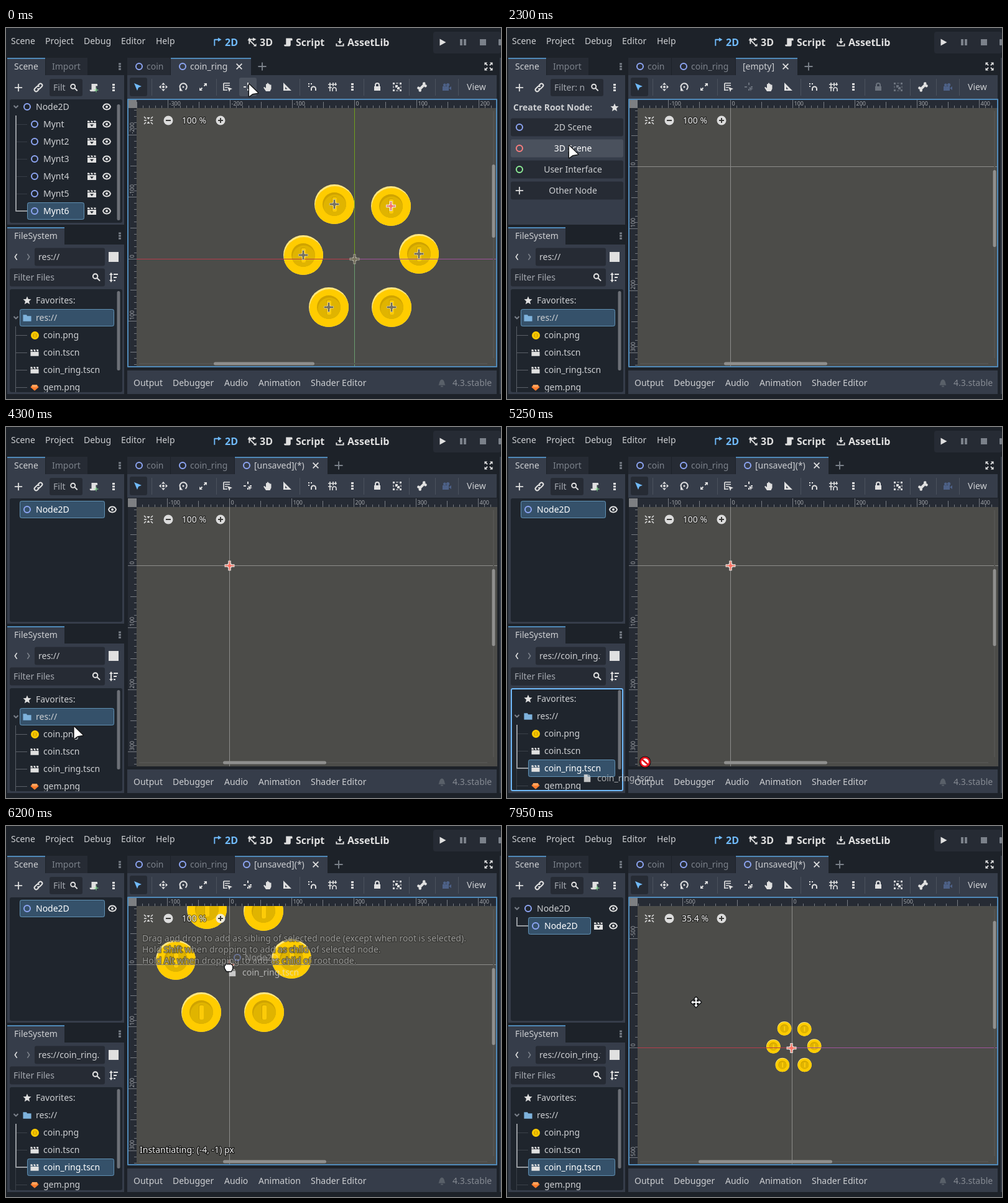
Write an HTML page with a canvas that moves like this. It is 796 px wide and 598 px high and loops after 8000 ms.

```html
<!DOCTYPE html>
<html lang="en">
<head>
<meta charset="utf-8">
<title>Scene instancing</title>
<style>
html, body { margin: 0; width: 100%; height: 100%; overflow: hidden; background: #1d2229; }
canvas { display: block; width: 100vw; height: 100vh; }
</style>
</head>
<body>
<canvas id="stage" width="796" height="598"></canvas>
<script>
const g = document.getElementById('stage').getContext('2d');
const LOOP = 8000, STEP = 50;
const BASE = '#363d4a', DARK1 = '#262b34', DARK2 = '#1d2229', TREE = '#1f252d', VIEW = '#4c4c49';
const ACCENT = '#70bafa', EDGE = '#5089b8', SELECT = '#35516a', HOVER = '#4a515d';
const ICON = '#e0e0e0', TEXT = '#cdcfd2', DIM = '#7b818a', NODE = '#8da5f3', RED = '#fc7f7f', GREEN = '#8eef97';
const FONT = '"Noto Sans", sans-serif';
const COINS = [[-32.5, -88.5], [58.5, -85.5], [103.5, -8.5], [-82.5, -6.5], [-41.5, 77.5], [59.5, 77.5]];

// Pointer keys: time, x, y
const POINTER = [
  [0, 391, 91], [300, 411, 60], [800, 411, 60], [1300, 287, 274], [1600, 118, 240], [1700, 118, 240],
  [2150, 100, 190], [2300, 100, 190], [3100, 93, 153], [3450, 93, 153], [4200, 108, 455], [4750, 114, 546],
  [4950, 114, 546], [5200, 121, 552], [5250, 222, 540], [5400, 390, 440], [5600, 452, 342], [5650, 446, 308],
  [5800, 424, 268], [6150, 356, 222], [6550, 356, 222], [7100, 470, 300], [7500, 470, 300],
  [7650, 276, 199], [7700, 276, 199], [7950, 304, 284]
];

// Icons on a 16 px box: fill path, stroke path, stroke width
const ICONS = {
  select: ['M2 2l12 5-5 2-2 5z'],
  move: ['M8 1l3 3.4H5zM8 15l3-3.4H5zM1 8l3.4-3v6zM15 8l-3.4-3v6zM6 8a2 2 0 1 0 4 0a2 2 0 1 0-4 0z'],
  rotate: ['M2 9v5.5h5.5zM6.5 8a1.5 1.5 0 1 0 3 0a1.5 1.5 0 1 0-3 0z', 'M4.6 12.2A5.6 5.6 0 1 1 11.5 12.4', 2],
  scale: ['M9 2h5v5zM2 9v5h5z', 'M4 12l2.5-2.5M9.5 6.5L12 4', 2],
  list: ['M8 8l8 3-3.4 1.4L11 16z', 'M2 2v12M2 2h10M4 5.5h8M4 9h4M2 13h6', 1.7],
  pivot: ['M8 8l7 3-3 1-1 3z', 'M8 1v4M8 11v3M1 8h4M11 8h3', 2],
  hand: ['M5 15L1 9l1.5-1L5 10V4a1 1 0 0 1 2 0V2.5a1 1 0 0 1 2 0V4a1 1 0 0 1 2 0v1.5a1 1 0 0 1 2.5 0V11l-2 4z'],
  angle: ['M2 1v13h13zM5 8v3.5h3.5z'],
  snap: ['M1 2h2v2H1zM1 6h2v2H1zM5 2h2v2H5z', 'M6 14v-3a3.5 3.5 0 0 1 7 0v3', 2],
  grid: ['', 'M1 4h14M1 9h6M4 1v14M9 1v6M13 1v5M8 15v-3a2.8 2.8 0 0 1 6 0v3', 1.6],
  dots: ['M6 2h4v3H6zM6 6.5h4v3H6zM6 11h4v3H6z'],
  lock: ['M3 7h10v7H3z', 'M5 8V5a3 3 0 0 1 6 0v3', 2],
  group: ['M1 1h3v3H1zM12 1h3v3h-3zM1 12h3v3H1zM12 12h3v3h-3zM5 5h4v4H5zM8 8h4v4H8z', 'M6 2h4M2 6v4M14 6v4M6 14h4', 1],
  bone: ['M9 3a2.3 2.3 0 1 1 4 1a2.3 2.3 0 1 1-1 4zM7 13a2.3 2.3 0 1 1-4-1a2.3 2.3 0 1 1 1-4z', 'M4.5 11.5l7-7', 4],
  camera: ['M1 7h10v7H1zM11 10l4-3v6zM2 5a2.4 2.4 0 1 0 4.8 0a2.4 2.4 0 1 0-4.8 0zM7 4.5a2.6 2.6 0 1 0 5.2 0a2.6 2.6 0 1 0-5.2 0z'],
  clap: ['M1 7h14v7H1zM1 3h3l1 3H1zM6 3h3l1 3H7zM11 3h3.5v3H12z'],
  open: ['M1 6h14v8H1zM1 2.5h3l1 2.5H1zM6 2.5h3l1 2.5H7zM11 2.5h3.5V5H12zM5 8.5l3 3.5 3-3.5z'],
  eye: ['M6 8a2 2 0 1 0 4 0a2 2 0 1 0-4 0z', 'M2 8C4 2 12 2 14 8C12 14 4 14 2 8z', 2],
  find: ['', 'M2.5 6a4 4 0 1 0 8 0a4 4 0 1 0-8 0M9.5 9l5 5', 2.2],
  plus: ['', 'M8 1v14M1 8h14', 2],
  cross: ['', 'M3 3l10 10M13 3L3 13', 2],
  link: ['', 'M7 5l2.5-2.5a2.8 2.8 0 0 1 4 4L10.500 9.500a2.800 2.800 0 0 1-4 0M9 11l-2.500 2.500a2.800 2.800 0 0 1-4-4L5.500 6.500a2.800 2.800 0 0 1 4 0', 2],
  script: ['M4 1h10a2 2 0 0 1 1 2v2h-3v7a3 3 0 0 1-3 3H3a2 2 0 0 1-2-3h3z'],
  star: ['M8 1l2 4.800 5 .4-3.800 3.400 1.200 5L8 12l-4.400 2.600 1.200-5L1 6.200l5-.4z'],
  folder: ['M1 3h6l1 2h7v9H1z'],
  sort: ['M4 0l3 4H1zM4 16l3-4H1z', 'M4 3v10M8 3h7M8 8h5M8 13h3', 2],
  full: ['M1 1h5L1 6zM15 1v5l-5-5zM1 15v-5l5 5zM15 15h-5l5-5z', 'M3 3l3 3M13 3l-3 3M3 13l3-3M13 13l-3-3', 2],
  two: ['M9 0l6 3.500L9 7z', 'M3 14V3.500h7', 2],
  three: ['M9 0l6 3L9 6zM10 15h5v-5zM0 5l3-5 3 5z', 'M3 4v7M3 3h7M4 5l9 9', 2],
  asset: ['M4 6h8l-4 5z', 'M8 1v6M2 10v4h12v-4', 2],
  center: ['M8 6.500L5.500 3h5zM8 9.500L5.500 13h5z', 'M1 2l3 3M15 2l-3 3M1 14l3-3M15 14l-3-3M1 8h4M11 8h4', 1.500],
  down: ['', 'M4.500 6L8 9.500 11.500 6', 2],
  left: ['', 'M10 2L6 8l4 6', 2],
  right: ['', 'M6 2l4 6-4 6', 2],
  bell: ['M2 12c2-2 1-9 6-10c5 1 4 8 6 10zM6 13h4v2H6z'],
  file: ['M2 1h7v4h5v10H2zM10 1l4 3h-4z'],
  gem: ['M4 4h8l3 4-7 6-7-6z']
};

function icon(name, x, y, color = ICON, size = 16) {
  const [fill, stroke, width] = ICONS[name];
  g.save();
  g.translate(x - size / 2, y - size / 2);
  g.scale(size / 16, size / 16);
  g.fillStyle = g.strokeStyle = color;
  if (fill) g.fill(new Path2D(fill), 'evenodd');
  if (stroke) { g.lineWidth = width; g.stroke(new Path2D(stroke)); }
  g.restore();
}
function box(x, y, w, h, fill, r = 0) {
  g.fillStyle = fill;
  g.beginPath(); g.roundRect(x, y, w, h, r); g.fill();
}
function frame(x, y, w, h, color, lw = 2, r = 2) {
  g.strokeStyle = color; g.lineWidth = lw;
  g.beginPath(); g.roundRect(x, y, w, h, r); g.stroke();
}
function line(color, w, ...p) {
  g.strokeStyle = color; g.lineWidth = w;
  g.beginPath();
  for (let i = 0; i < p.length; i += 2) g.lineTo(p[i], p[i + 1]);
  g.stroke();
}
function disc(x, y, r, color) {
  g.fillStyle = color;
  g.beginPath(); g.arc(x, y, r, 0, 7); g.fill();
}
function ring(x, y, color = NODE, r = 5) {
  g.strokeStyle = color; g.lineWidth = 2;
  g.beginPath(); g.arc(x, y, r, 0, 7); g.stroke();
}
function text(s, x, y, color = TEXT, { size = 14, bold, align = 'left', outline } = {}) {
  g.font = (bold ? '700 ' : '') + size + 'px ' + FONT;
  g.textAlign = align;
  if (outline) {
    g.strokeStyle = outline; g.lineWidth = 2.5; g.lineJoin = 'round';
    g.strokeText(s, x, y + 5);
  }
  g.fillStyle = color;
  g.fillText(s, x, y + 5);
}
function clipped(x, y, w, h, draw) {
  g.save();
  g.beginPath(); g.rect(x, y, w, h); g.clip();
  draw();
  g.restore();
}
function field(x, y, w, h, s, color, room) {
  box(x, y, w, h, DARK1, 3);
  clipped(x, y, room, h, () => text(s, x + 6, y + h / 2, color));
}
function selected(x, y, w) {
  box(x, y - 14, w, 28, SELECT, 3);
  frame(x + .5, y - 13.5, w - 1, 27, '#6191b3', 1, 3);
}
function tab(x, y, w, active) {
  box(x, y, w, 28, active ? BASE : DARK1);
  if (active) box(x, y, w, 2, EDGE);
}

function pointer(t) {
  const k = POINTER;
  let i = 0;
  while (i < k.length - 2 && t >= k[i + 1][0]) i++;
  const a = k[i], b = k[i + 1], d = b[0] - a[0];
  const u = Math.min(1, (t - a[0]) / d);
  const slope = (n, c) => {
    const p = k[n - 1], q = k[n], r = k[n + 1];
    const still = (m, s) => m[1] === s[1] && m[2] === s[2];
    return !p || !r || still(p, q) || still(q, r) ? 0 : (r[c] - p[c]) / (r[0] - p[0]);
  };
  const at = c => {
    const u2 = u * u, u3 = u2 * u;
    return (2 * u3 - 3 * u2 + 1) * a[c] + (u3 - 2 * u2 + u) * d * slope(i, c)
      + (3 * u2 - 2 * u3) * b[c] + (u3 - u2) * d * slope(i + 1, c);
  };
  return { x: at(1), y: at(2) };
}

function stateAt(t) {
  const mouse = pointer(t);
  const s = {
    t, mouse,
    page: t < 800 ? 'ring' : t < 3450 ? 'empty' : 'unsaved',
    picked: t >= 4900,
    dragging: t >= 5100 && t < 6500,
    over: t >= 5300 && t < 6500,
    dropped: t >= 6500,
    panning: t >= 7700,
    zoom: 2 ** (-Math.max(0, Math.min(3, Math.floor((t - 7200) / 100))) / 2),
    ghost: pointer(t - STEP)
  };
  if (s.page === 'ring') s.origin = { x: 560.5, y: 372.5 };
  else {
    const pan = s.panning ? mouse : { x: 276, y: 199 };
    s.origin = {
      x: 470 + (359.5 - 470) * s.zoom + pan.x - 276,
      y: 300 + (223.5 - 300) * s.zoom + pan.y - 199
    };
  }
  return s;
}

function drawTop() {
  ['Scene', 'Project', 'Debug', 'Editor', 'Help'].forEach((m, i) => text(m, [8, 63, 125, 185, 241][i], 21));
  [['two', 340, '2D', 352], ['three', 396, '3D', 408], ['script', 454, 'Script', 466], ['asset', 537, 'AssetLib', 549]]
    .forEach(([n, x, s, tx], i) => {
      const c = i ? ICON : ACCENT;
      icon(n, x, 23, c, 15);
      text(s, tx, 24, c, { size: 16, bold: true });
    });
  box(687, 6, 109, 35, DARK1, 4);
  g.fillStyle = ICON;
  g.fill(new Path2D('M697.500 17.500v11l10-5.500z'));
  box(730, 18, 4, 10, DIM); box(736, 18, 4, 10, DIM);
  box(762, 18, 10, 10, DIM);
  box(792, 18, 4, 10, DIM, 1);
}

function drawSceneDock(s) {
  tab(2, 48, 61, true); tab(64, 48, 67, false);
  text('Scene', 13, 62); text('Import', 74, 62, DIM);
  icon('dots', 183, 62, DIM, 15);
  box(2, 76, 188, 241, BASE);
  icon('plus', 20, 96, ICON, 14); icon('link', 52, 96); icon('dots', 173, 96);
  const empty = s.page === 'empty';
  field(70, 82, empty ? 85 : 53, 28, 'Filter: name', '#a5a9b0', empty ? 56 : 26);
  icon('find', empty ? 141 : 109, 96, ICON, 14);
  if (empty) return drawRootChoice(s);
  icon('script', 141, 96, ICON, 14);
  icon('plus', 145, 100, GREEN, 8);
  box(6, 115, 181, 199, TREE, 3);
  if (s.page === 'ring') {
    icon('down', 16, 127, DIM); ring(34, 127); text('Node2D', 48, 127); icon('eye', 162, 127);
    for (let i = 0; i < 6; i++) {
      const y = 155 + i * 28;
      if (i === 5) selected(34, y, 92);
      else line('#363c45', 1, 17, y + .5, 34, y + .5);
      ring(46, y); text('Mynt' + (i ? i + 1 : ''), 60, y, i === 5 ? '#fff' : TEXT);
      icon('open', 138, y); icon('eye', 162, y);
    }
    line('#979ba0', 2, 16, 141, 16, 295, 34, 295);
    box(178.5, 123, 5, 187, '#6c7077', 2.5);
    return;
  }
  if (!s.dropped) selected(22, 133, 137);
  else {
    icon('down', 16, 133, DIM);
    line('#979ba0', 2, 16, 147, 16, 161, 34, 161);
    selected(34, 161, 101);
    ring(46, 161); text('Node2D', 60, 161, '#fff');
    icon('open', 147, 161); icon('eye', 171, 161);
  }
  ring(34, 133); text('Node2D', 48, 133, s.dropped ? TEXT : '#fff'); icon('eye', 171, 133);
}

function drawRootChoice(s) {
  text('Create Root Node:', 10, 128, TEXT, { bold: true });
  icon('star', 173, 128, ICON, 15);
  ['2D Scene', '3D Scene', 'User Interface', 'Other Node'].forEach((label, i) => {
    const y = 160 + i * 34, { x, y: my } = s.mouse;
    const press = !i && s.t >= 3200;
    const hover = !press && x < 187 && Math.abs(my - y) < 15;
    box(6, y - 14.5, 181, 29, hover ? HOVER : DARK1, 3);
    if (press) frame(7, y - 13.500, 179, 27, ACCENT);
    if (i < 3) ring(20, y, press ? '#478cf0' : [NODE, RED, GREEN][i]);
    else icon('plus', 20, y, ICON, 14);
    text(label, 106, y, press ? ACCENT : hover ? '#fff' : TEXT, { align: 'center' });
  });
}

function drawFiles(s) {
  tab(2, 321, 92, true);
  text('FileSystem', 13, 335);
  icon('dots', 183, 335, DIM, 15);
  box(2, 349, 188, 241, BASE);
  icon('left', 16, 369, ICON, 13); icon('right', 36, 369, DIM, 13);
  field(46, 354.5, 113, 29, s.picked ? 'res://coin_ring.tscn' : 'res://', TEXT, 105);
  box(165, 361, 16, 16, ICON);
  field(6, 387.5, 153, 29, 'Filter Files', '#a5a9b0', 130);
  icon('find', 145, 402, ICON, 15); icon('sort', 173, 402);
  box(6, 421, 181, 166, TREE, 3);
  clipped(6, 421, 181, 166, () => {
    const top = s.picked ? 438 : 439, row = i => top + i * 28;
    if (s.picked) selected(34, row(4), 140); else selected(22, row(1), 152);
    icon('star', 34, row(0), ICON, 15); text('Favorites:', 48, row(0));
    icon('down', 16, row(1), DIM); icon('folder', 34, row(1), '#7eb2dc', 15); text('res://', 48, row(1));
    const faint = s.picked ? '#3b4149' : '#5b6068';
    line(faint, 1, 15.5, row(1) + 14, 15.5, 590);
    ['coin.png', 'coin.tscn', 'coin_ring.tscn', 'gem.png'].forEach((name, i) => {
      const y = row(i + 2);
      if (!s.picked || i !== 2) line(faint, 1, 16, y + .5, 34, y + .5);
      if (!i) { disc(46.5, y + .5, 6.5, '#ffcc00'); disc(46.5, y + .5, 3.5, '#d9aa00'); box(45.5, y - 2, 2, 5, '#ffcc00'); }
      else if (i < 3) icon('clap', 46, y, ICON, 15);
      else { icon('gem', 46, y, '#ff7d2e', 15); box(42, y - 4, 8, 4, '#ffa35c'); }
      text(name, 60, y, s.picked && i === 2 ? '#fff' : TEXT);
    });
    if (s.picked) line('#979ba0', 2, 16, row(1) + 14, 16, row(4), 34, row(4));
  });
  box(178.5, 424, 5, 128, '#6c7077', 2.5);
  if (s.picked && s.t < 5300) frame(7, 422, 179, 164, ACCENT);
}

function drawTabs(s) {
  const ringPage = s.page === 'ring', hot = s.t >= 200 && s.t < 850;
  tab(195, 48, 69, false); ring(214, 62); text('coin', 226, 62, DIM);
  tab(265, 48, ringPage ? 129 : 102, ringPage);
  ring(284, 62); text('coin_ring', 296, 62, ringPage ? TEXT : DIM);
  let end = 394;
  if (!ringPage) {
    const empty = s.page === 'empty';
    end = empty ? 467 : 517;
    tab(368, 48, end - 368, true);
    if (!empty) ring(387, 62);
    text(empty ? '[empty]' : '[unsaved](*)', empty ? 379 : 399, 62);
  }
  icon('cross', end - 19, 62, ICON, 14);
  icon('plus', end + 18, 62, hot ? ICON : DIM, 15);
  icon('full', 776, 62, ICON, 15);
}

function drawTools(s) {
  box(195, 76, 594, 38, BASE);
  box(199, 80, 28, 30, DARK1, 3);
  if (s.page === 'ring' && s.mouse.y > 80) box(375, 80, 28, 30, HOVER, 3);
  [234, 338, 472, 575, 648, 690, 727].forEach(x => line('#4b525e', 1, x + .5, 82, x + .5, 109));
  icon('select', 212, 95, ACCENT);
  const off = s.page === 'empty' ? '#6b727d' : ICON;
  Object.entries({ move: 253, rotate: 285, scale: 317, list: 356, hand: 421, angle: 452, snap: 493, grid: 525, dots: 557, bone: 669 })
    .forEach(([n, x]) => icon(n, x, 95));
  icon('pivot', 389, 95, off); icon('lock', 597, 95, off); icon('group', 629, 95, off);
  icon('camera', 709, 95, '#4d6187');
  text('View', 741, 95);
}

function coin(x, y, z) {
  g.save();
  g.translate(x, y); g.scale(z, z);
  disc(0, 0, 32, '#ffe680');
  g.beginPath(); g.arc(0, 0, 32, 0, 7); g.clip();
  disc(1, 3, 32, '#ffcc00');
  disc(0, 0, 19, '#cfa300');
  g.beginPath(); g.arc(0, 0, 19, 0, 7); g.clip();
  disc(1, 3, 18.5, '#e0b400');
  box(-4, -12, 8, 24, '#d0a400', 2);
  box(-3, -11, 7, 23, '#fccb08', 2);
  g.restore();
}
function coinRing(x, y, z) { COINS.forEach(([dx, dy]) => coin(x + dx * z, y + dy * z, z)); }

function gizmo(x, y, on) {
  const plus = (r, w, c) => { line(c, w, x - r, y, x + r, y); line(c, w, x, y - r, x, y + r); };
  plus(8, on ? 4.5 : 4, on ? '#e8e2de' : 'rgba(196,192,176,.75)');
  disc(x, y, 4, on ? '#e8e2de' : 'rgba(196,192,176,.75)');
  plus(7, 2, on ? '#ee7a6a' : '#6a6552');
  disc(x, y, 2.6, on ? '#ff7264' : '#77725e');
}

function rulers(o, z) {
  box(196, 115, 594, 14, DARK1); box(196, 115, 14, 432, DARK1);
  const major = z < 1 ? 500 : 100, gap = major * z / 10;
  const len = i => i % 10 ? i % 5 ? 4 : 10 : 14;
  const opts = { size: 9 }, c = '#a2a5a9', tick = '#777b82';
  for (let i = Math.ceil((210 - o.x) / gap); o.x + i * gap < 789; i++) {
    const x = Math.floor(o.x + i * gap) + .5;
    line(tick, 1, x, 129 - len(i), x, 129);
    if (i % 10 === 0) text(String(i / 10 * major), x + 2, 120, c, opts);
  }
  for (let i = Math.ceil((129 - o.y) / gap); o.y + i * gap < 546; i++) {
    const y = Math.floor(o.y + i * gap) + .5;
    line(tick, 1, 210 - len(i), y, 210, y);
    if (i % 10) continue;
    g.save();
    g.translate(206, y - 2); g.rotate(-Math.PI / 2);
    text(String(i / 10 * major), 0, -5, c, opts);
    g.restore();
  }
  box(196, 115, 14, 14, '#7d7f82');
}

function drawCanvas(s) {
  const { origin: o, zoom: z, page, mouse, ghost } = s;
  const drop = { x: Math.round(ghost.x) - 360, y: Math.round(ghost.y) - 223 };
  box(196, 115, 594, 432, VIEW);
  clipped(210, 129, 580, 418, () => {
    if (page === 'ring') coinRing(o.x, o.y, 1);
    if (s.over) coinRing(o.x + drop.x, o.y + drop.y, 1);
    if (s.dropped) coinRing(o.x - 4 * z, o.y - z, z);
    const x = Math.floor(o.x) + .5, y = Math.floor(o.y) + .5;
    const plain = '#8d8d8b', tint = page === 'ring' || z < 1;
    line(tint ? '#b53c4c' : plain, 1, 210, y, x, y);
    line(tint ? '#a0539c' : plain, 1, x, y, 790, y);
    line(page === 'ring' ? '#71a21c' : plain, 1, x, 129, x, y);
    line(page === 'ring' ? '#6b9e70' : plain, 1, x, y, x, 547);
    if (page === 'ring') {
      gizmo(o.x, o.y, false);
      COINS.forEach(([dx, dy], i) => gizmo(o.x + dx, o.y + dy, i === 1));
    }
    if (page === 'unsaved') gizmo(o.x - (s.dropped ? 4 * z : 0), o.y, true);
  });
  rulers(o, z);

  // Scroll bars
  const k = page === 'ring' ? 0 : (1 - z) / (1 - 2 ** -1.5);
  const mix = (a, b) => a + (b - a) * k;
  const [hx, hw, vy, vh] = page === 'ring' ? [334, 162, 220, 118]
    : [mix(349, 308), mix(166, 215), mix(229, 153), mix(124, 174)];
  box(214, 540, 560, 2, '#545452'); box(783, 134, 2, 398, '#545452');
  box(hx, 538.5, hw, 5, '#8f8f8e', 2.500); box(781.500, vy, 5, vh, '#8f8f8e', 2.500);

  // Zoom controls
  icon('center', 229, 149);
  g.globalAlpha = .88;
  disc(261, 149, 7.5, '#f0f0f0'); disc(345, 149, 7.5, '#f0f0f0');
  g.globalAlpha = 1;
  line('#3c3c3a', 2, 257, 149, 265, 149); line('#3c3c3a', 2, 341, 149, 349, 149); line('#3c3c3a', 2, 345, 145, 345, 153);
  text(+(z * 100).toFixed(1) + ' %', 302.5, 149, '#f0f0f0', { align: 'center', outline: 'rgba(0,0,0,.45)' });

  if (s.over) {
    ['Drag and drop to add as sibling of selected node (except when root is selected).',
      'Hold Shift when dropping to add as child of selected node.',
      'Hold Alt when dropping to add as child of root node.'
    ].forEach((m, i) => text(m, 219, 181 + i * 18, '#969694', { outline: 'rgba(40,40,38,.5)' }));
    text(`Instantiating: (${drop.x}, ${drop.y}) px`, 215, 522, '#f2f2f2', { outline: 'rgba(0,0,0,.7)' });
    if (Math.hypot(mouse.x - 360, mouse.y - 223) < 10) {
      g.globalAlpha = .45;
      ring(mouse.x + 16, mouse.y - 10); text('Node2D', mouse.x + 28, mouse.y - 10, ICON);
      g.globalAlpha = 1;
    }
  }
  if (s.t < 3200 || s.t >= 5300) frame(196, 115, 593, 431, EDGE, 2, 0);
}

function drawBottom() {
  box(195, 552, 594, 38, BASE);
  [['Output', 205], ['Debugger', 268], ['Audio', 351], ['Animation', 406], ['Shader Editor', 490]]
    .forEach(([m, x]) => text(m, x, 572));
  icon('bell', 701, 572, '#596069', 15);
  text('4.3.stable', 718, 572, '#858a92');
}

function outlined(d, x, y) {
  const p = new Path2D(d);
  g.save();
  g.translate(x, y);
  g.lineJoin = 'round'; g.lineWidth = 3; g.strokeStyle = '#16181a'; g.stroke(p);
  g.fillStyle = '#fff'; g.fill(p);
  g.restore();
}
function drawPointer(s) {
  const { x, y } = s.mouse;
  if (s.dragging) {
    const p = s.ghost;
    g.globalAlpha = .85;
    icon('file', p.x + 8, p.y + 14, ICON, 14);
    g.globalAlpha = .7;
    text('coin_ring.tscn', p.x + 24, p.y + 14, ICON);
    g.globalAlpha = 1;
  }
  if (s.over) {
    outlined('M-5-4q2-2 3 0q1-2 3 0q1-2 3 0q2 0 2 2v4l-2 4h-7l-3-5v-3q0-1 2-1z', x + 2, y + 6);
  } else if (s.dragging) {
    disc(x, y, 9.5, '#111'); disc(x, y, 8.5, '#e8121c'); disc(x, y, 5.8, '#fff');
    line('#e8121c', 3, x - 4.5, y - 4, x + 4.5, y + 4);
  } else if (s.panning) {
    outlined('M0-8l3 3.500h-2v3.500h3.500v-2L8 0L4.500 3v-2H1v3.500h2L0 8l-3-3.500h2V1h-3.500v2L-8 0l3.500-3v2H-1v-3.500h-2z', x, y);
  } else {
    outlined('M0 0v19l5.500-4L14 13.500z', x, y);
  }
}

function draw(t) {
  const s = stateAt(t);
  box(0, 0, 796, 598, DARK2);
  drawTop();
  drawSceneDock(s);
  drawFiles(s);
  drawTabs(s);
  drawTools(s);
  drawCanvas(s);
  drawBottom();
  box(794, 48, 2, 542, BASE);
  drawPointer(s);
}

const start = performance.now();
function tick() {
  const t = Math.max(0, performance.now() - start) % LOOP;
  draw(Math.floor(t / STEP) * STEP);
  requestAnimationFrame(tick);
}
tick();
</script>
</body>
</html>
```
